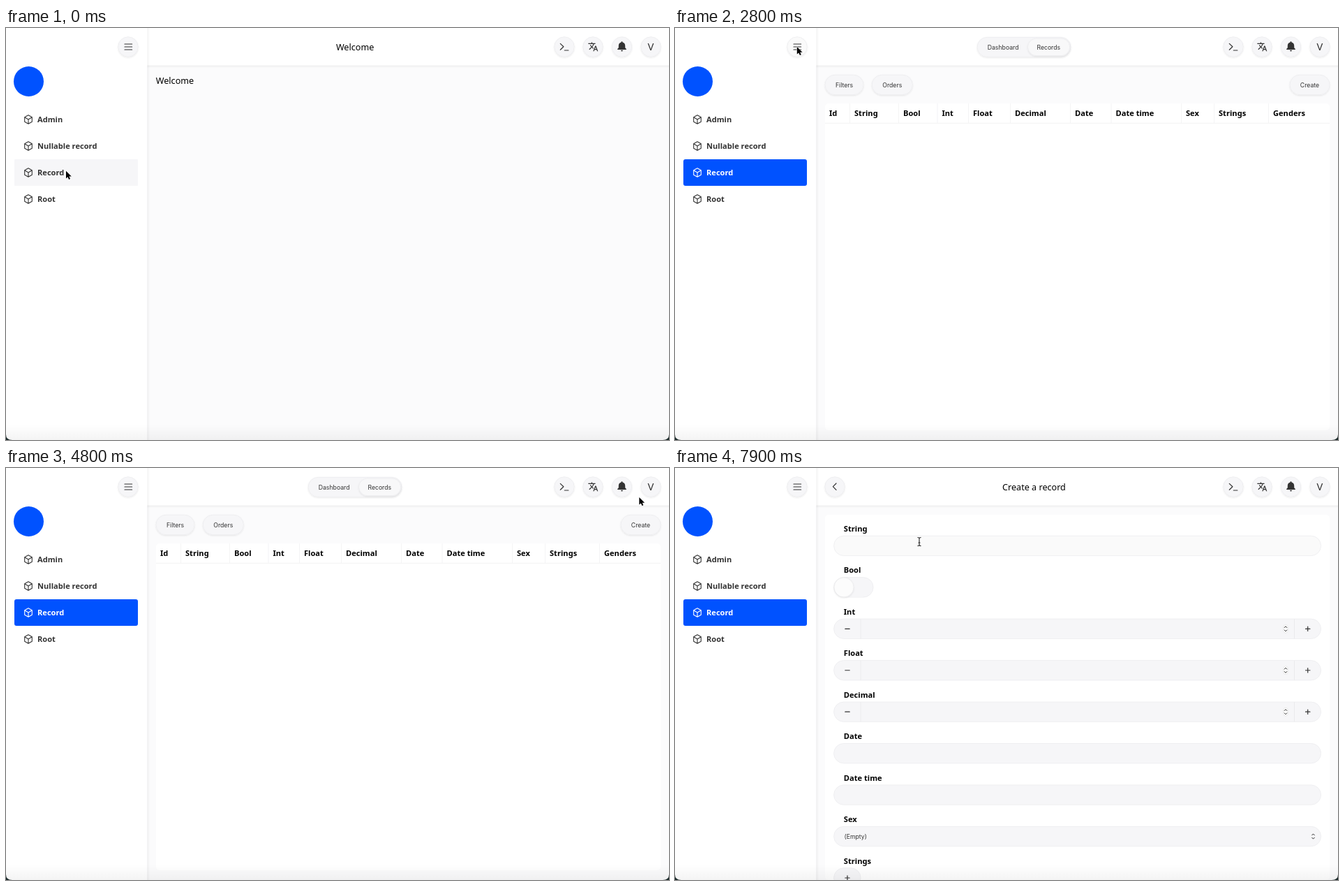
Recreate the animation shown at these times as an HTML page. Size 950x590 px, loop 8 s.

```html
<!DOCTYPE html>
<html lang="en">
<head>
<meta charset="utf-8">
<title>Record admin</title>
<style>
html, body { margin: 0; width: 100%; height: 100%; overflow: hidden; background: #fff; }
svg { display: block; width: 950px; height: 590px; }
text { font-family: "Noto Sans", sans-serif; fill: #000; white-space: pre; }
.title { font-size: 12.6px; }
.bold { font-size: 11.1px; font-weight: 700; }
.mini { font-size: 7.55px; font-weight: 700; }
.ui { font-family: Inter, sans-serif; font-size: 8.7px; fill: #333; }
.line { fill: none; stroke: #333; stroke-width: 1.2; stroke-linecap: round; stroke-linejoin: round; }
</style>
</head>
<body>
<svg viewBox="0 0 950 590">
  <defs>
    <filter id="soft" x="-30%" y="-30%" width="160%" height="170%">
      <feDropShadow dx="0" dy="1" stdDeviation="1" flood-color="#000" flood-opacity=".09"/>
    </filter>
    <linearGradient id="foot" x1="0" y1="0" x2="0" y2="1">
      <stop offset="0" stop-color="#000" stop-opacity="0"/>
      <stop offset="1" stop-color="#000" stop-opacity=".045"/>
    </linearGradient>
    <linearGradient id="down" x1="0" y1="0" x2="0" y2="1">
      <stop offset="0" stop-color="#000" stop-opacity=".055"/>
      <stop offset="1" stop-color="#000" stop-opacity="0"/>
    </linearGradient>
    <linearGradient id="side">
      <stop offset="0" stop-color="#000" stop-opacity=".055"/>
      <stop offset="1" stop-color="#000" stop-opacity="0"/>
    </linearGradient>
    <linearGradient id="shine" gradientUnits="userSpaceOnUse" x1="330" x2="470" y1="0" y2="0">
      <stop offset="0" stop-color="#f3f3f3"/>
      <stop offset=".5" stop-color="#ebebeb"/>
      <stop offset="1" stop-color="#f2f2f2"/>
    </linearGradient>
  </defs>
  <g id="app"></g>
  <rect y="568" width="950" height="22" fill="url(#foot)"/>
  <path d="M0 582Q0 590 9 590H0ZM950 582Q950 590 941 590H950Z" fill="#1b2a2a"/>
  <g id="arrow">
    <path d="M0 0V10.6L2.5 8.4 4.1 12.1 6 11.3 4.4 7.7H7.8Z" fill="#000" stroke="#fff" stroke-width=".9" stroke-linejoin="round" paint-order="stroke"/>
  </g>
  <g id="beam">
    <path d="M-2.5 -6Q0 -6 0 -4.5Q0 -6 2.5 -6M0 -4.5V4.5M-2.5 6Q0 6 0 4.5Q0 6 2.5 6M-1.4 1.5H1.4" fill="none" stroke="#222" stroke-width="1.1"/>
  </g>
</svg>
<script>
const LOOP = 8000, STEP = 100;
const BLUE = '#0052ff', GREY = '#f6f6f8', PALE = '#fbfbfc';
const $ = id => document.getElementById(id);

const rect = (x, y, w, h, fill, r = 0, more = '') =>
  `<rect x="${x}" y="${y}" width="${w}" height="${h}" rx="${r}" fill="${fill}" ${more}/>`;
const text = (s, x, y, cls, more = '') => `<text x="${x}" y="${y}" class="${cls}" ${more}>${s}</text>`;
const mid = (s, x, y, cls, more = '') => text(s, x, y, cls, `text-anchor="middle" ${more}`);
const line = (d, more = '') => `<path class="line" d="${d}" ${more}/>`;
const edge = 'stroke="#ededef" stroke-width=".8"';

const disc = (x, fill = GREY) => `<circle cx="${x}" cy="27" r="14.2" fill="${fill}" ${edge} filter="url(#soft)"/>`;
const pill = (s, x, w, fill = GREY) =>
  rect(x, 67.2, w, 28.4, fill, 14.2, edge + ' filter="url(#soft)"') + mid(s, x + w / 2, 84.5, 'ui');
const cube = (x, y, color) => line(
  `M${x} ${y - 6.2}l5.3 3v6.4l-5.3 3-5.3-3v-6.4zM${x - 5.3} ${y - 3.2}l5.3 3.2 5.3-3.2M${x} ${y}v6.2`,
  `style="stroke:${color};stroke-width:1.1"`);

const MENU = ['Admin', 'Nullable record', 'Record', 'Root'];
const HEADS = ['Id', 'String', 'Bool', 'Int', 'Float', 'Decimal', 'Date', 'Date time', 'Sex', 'Strings', 'Genders'];
const WIDE = [214.5, 250.5, 320.5, 376, 420.5, 480.5, 566.5, 625, 725.5, 772.5, 850.5];
const FULL = [87.5, 130, 211.5, 277.5, 329, 400.5, 501, 570.5, 688.5, 743.5, 835.5];

function sidebar(s) {
  const mx = s.open ? 175 : 37;
  let o = rect(0, 0, s.left, 590, '#fff');
  o += disc(mx, s.press ? '#ececee' : s.overMenu ? '#fafafa' : GREY);
  o += line([23, 27, 31].map(y => `M${mx - 5} ${y}h10.6`).join(''));
  o += `<circle cx="${s.open ? 32.5 : 37.3}" cy="76.5" r="21.5" fill="${BLUE}"/>`;
  MENU.forEach((name, i) => {
    const on = i === 2 && s.page !== 'welcome';
    const ink = on ? '#fff' : '#333', tint = `style="fill:${ink}"`;
    const bg = on ? (s.overItem ? '#1a63ff' : BLUE) : i === 2 ? GREY : 'none';
    if (s.open) {
      const y = 131 + 38 * i;
      o += rect(12, y - 19, 177, 38, bg, on ? 3 : 1) + cube(32, y, ink) + text(name, 45, y + 4, 'bold', tint);
    } else {
      const y = [128, 167.5, 216.5, 261][i];
      o += rect(12, y - 15.5, 50, 44, on ? bg : 'none', 3) + cube(37, y, ink);
      name.split(' ').forEach((w, k) => o += mid(w, 37, y + 17.2 + k * 10, 'mini', tint));
    }
  });
  return o;
}

function header(s) {
  const c = (s.left + 798) / 2;
  let o = rect(s.left, 0, 950 - s.left, 54, '#fff');
  o += rect(s.left, 53.5, 950 - s.left, 4, 'url(#down)') + rect(s.left, 0, 4, 590, 'url(#side)');
  if (s.page === 'welcome') o += mid('Welcome', c, 31.5, 'title');
  else if (s.page === 'form') {
    o += disc(229) + line('M231 22l-4.6 4.7 4.6 4.7') + mid('Create a record', 514.5, 31.5, 'title');
  } else {
    const list = s.page === 'list';
    o += rect(c - 67, 13.3, 134, 28, GREY, 14, edge + ' filter="url(#soft)"');
    o += rect(list ? c + 5.5 : c - 66, 15, list ? 60 : 72, 24.6, '#f8f8f9', 12.3, edge + ' filter="url(#soft)"');
    o += mid('Dashboard', c - 30, 30.6, 'ui') + mid('Records', c + 35.2, 30.6, 'ui');
  }
  o += [800, 841, 882.5, 924].map(x => disc(x)).join('');
  o += line('M794.3 22.4l4.6 4.4-4.6 4.4M800.3 32h5.6');
  o += '<path transform="translate(833.7 19.2) scale(.635)" fill="#333" d="M12.87 15.07l-2.54-2.51.03-.03A17.52 17.52 0 0 0 14.07 6H17V4h-7V2H8v2H1v2h11.17C11.5 7.92 10.44 9.75 9 11.35 8.07 10.32 7.3 9.19 6.69 8h-2c.73 1.63 1.73 3.17 2.98 4.56l-5.09 5.02L4 19l5-5 3.11 3.11zM18.5 10h-2L12 22h2l1.12-3h4.75L21 22h2zm-2.62 7l1.62-4.33L19.12 17z"/>';
  o += '<path fill="#333" d="M882.5 19.2q1.1 0 1.1 1.4c2.5.6 3.6 2.4 3.6 5v2.6l1.6 1.8v.9h-12.6v-.9l1.6-1.8v-2.6c0-2.6 1.1-4.4 3.6-5q0-1.4 1.1-1.4zM880.9 31.7h3.2q-.3 1.7-1.6 1.7t-1.6-1.7z"/>';
  return o + mid('V', 924, 32.2, '', 'font-size="14.6" style="fill:#333"');
}

function list(s) {
  const x = s.left + 12.8;
  let o = rect(x, 108, 938 - x, 468, '#fff', 5);
  o += pill('Filters', x, 55) + pill('Orders', x + 67.3, 58) + pill('Create', 881, 57, s.overCreate ? '#fafafb' : GREY);
  if (s.loading) {
    for (let i = 0; i < 6; i++)
      [[227.5, 16], [250, 79], [335, 48], [389.5, 142.5]].forEach(([bx, w], k) =>
        o += rect(bx, 120.7 + 28.55 * i, w, 15.4, k < 3 ? '#f3f3f3' : 'url(#shine)', 3));
    return o;
  }
  const xs = s.open ? WIDE : FULL;
  HEADS.forEach((h, i) => {
    if (i) o += rect(xs[i] - .5, 108, 1, 28, '#f4f4f5');
    o += text(h, xs[i] + 6.5, 126, 'bold');
  });
  return o + rect(x, 135.8, 938 - x, 1, '#f2f2f3');
}

const rowY = i => 97.2 + 59.45 * i;
function form(s) {
  let o = rect(215, 67, 723, 523, '#fff', 5);
  const sign = (x, y, plus) => line(`M${x - 3.2} ${y}h6.4` + (plus ? `M${x} ${y - 3.2}v6.4` : ''));
  const arrows = (x, y) => line(`M${x - 1.8} ${y - 1.7}l1.8-1.9 1.8 1.9M${x - 1.8} ${y + 1.7}l1.8 1.9 1.8-1.9`, 'style="stroke-width:1"');
  HEADS.slice(1, 10).forEach((h, i) => {
    const y = rowY(i), cy = y + 14.2;
    o += text(h, 241.8, y - 6.2, 'bold');
    const w = i === 1 ? 56.5 : i === 8 ? 38.5 : 698;
    o += rect(227.6, y, w, 28.4, i === 0 && s.overField ? '#fafafa' : GREY, 14.2, edge);
    if (i === 1) o += `<circle cx="242" cy="${cy}" r="14" fill="#fcfcfc" stroke="#e6e6e8" stroke-width=".6" filter="url(#soft)"/>`;
    if (i > 1 && i < 5) {
      o += rect(265.5, y, 1, 28.4, '#ebebed') + rect(887, y, 1, 28.4, '#ebebed');
      o += sign(247, cy) + sign(906.7, cy, true);
      o += rect(871.8, cy - 5.8, 6.4, 11.6, '#fff', 3.2, 'stroke="#ddd" stroke-width=".6"') + arrows(875, cy);
    }
    if (i === 7) o += text('(Empty)', 242.5, cy + 3.2, 'ui') + arrows(914.5, cy);
    if (i === 8) o += sign(247, cy, true);
  });
  return o;
}

// time, x, y of the pointer
const PATH = [
  [500, 86, 204.8], [1200, 516.6, 21.5], [1500, 516.6, 21.5], [1900, 420, 150], [2300, 255, 100],
  [2800, 174.8, 27], [2900, 174.8, 27], [3400, 38.5, 27], [3500, 38.5, 26.5], [3900, 38.5, 26.5],
  [4400, 760, 75], [4800, 907.3, 42], [5300, 907.3, 42], [5700, 918.5, 36.5], [5900, 918.5, 36.5],
  [6300, 909, 78.5], [6600, 909, 78.5], [7400, 268, 432], [7900, 350, 105.5]
];
function pointer(t) {
  const i = PATH.findIndex(k => k[0] > t);
  if (i === 0) return PATH[0].slice(1);
  if (i < 0) return PATH[PATH.length - 1].slice(1);
  const [a, b] = [PATH[i - 1], PATH[i]];
  const u = (t - a[0]) / (b[0] - a[0]), e = u * u * (3 - 2 * u);
  return [a[1] + (b[1] - a[1]) * e, a[2] + (b[2] - a[2]) * e];
}

let last = '';
function draw(t) {
  const [x, y] = pointer(t);
  const open = t < 3000 || t >= 3700;
  const page = t < 300 ? 'welcome' : t < 1500 ? 'dash' : t < 6600 ? 'list' : 'form';
  const inRow = i => x > 228 && x < 925 && y > rowY(i) && y < rowY(i) + 28.4;
  const s = {
    open, page, left: open ? 202.2 : 75.5,
    loading: t >= 1500 && t < 1700,
    overMenu: Math.hypot(x - (open ? 175 : 37), y - 27) < 14,
    press: t === 3600,
    overItem: open && x < 189 && y > 188 && y < 226,
    overCreate: page === 'list' && x > 881 && x < 938 && y > 67 && y < 96,
    overField: page === 'form' && inRow(0)
  };
  const key = JSON.stringify(s);
  if (key !== last) {
    last = key;
    $('app').innerHTML = rect(0, 0, 950, 590, PALE) +
      (page === 'welcome' ? text('Welcome', 214.8, 80, 'title') : page === 'list' ? list(s) : page === 'form' ? form(s) : '') +
      header(s) + sidebar(s);
  }
  const shift = (t - 1500) * .9;
  $('shine').setAttribute('gradientTransform', `translate(${s.loading ? shift : 0} 0)`);
  const typing = page === 'form' && [0, 2, 3, 4, 5, 6].some(inRow);
  $('arrow').style.display = typing ? 'none' : '';
  $('beam').style.display = typing ? '' : 'none';
  $(typing ? 'beam' : 'arrow').setAttribute('transform', `translate(${x} ${y})`);
}

const start = performance.now();
function tick() {
  const t = (performance.now() - start) % LOOP;
  draw(Math.floor(t / STEP) * STEP);
  requestAnimationFrame(tick);
}
tick();
</script>
</body>
</html>
```
